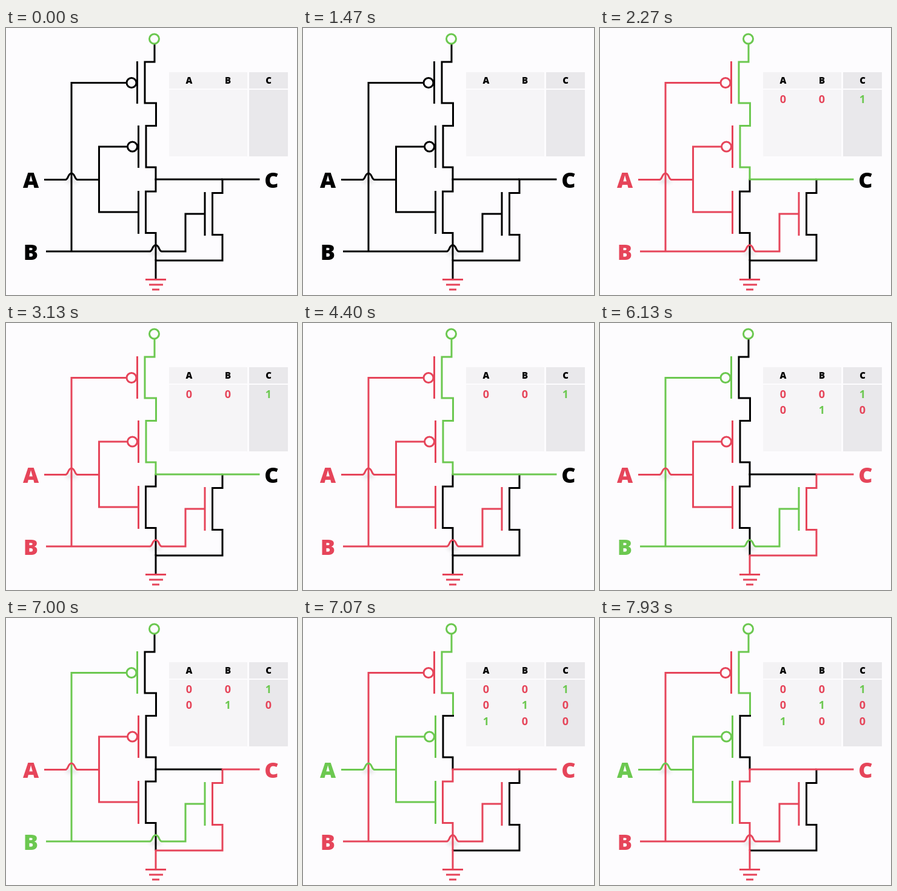
Recreate the animation shown at these times as an HTML page. Size 480 by 441 pixels, loop 8000 ms.

```html
<!DOCTYPE html>
<html lang="en">
<head>
<meta charset="utf-8">
<title>NOR gate</title>
<style>
  html, body { margin: 0; width: 100%; height: 100%; overflow: hidden; background: #fdfcfe; }
  svg { display: block; width: 100vw; height: 100vh; }
  .wire { fill: none; stroke-width: 3; }
  text { font-family: "Open Sans", sans-serif; font-weight: 800; text-anchor: middle; }
  .pin { font-size: 36px; }
  .head { font-size: 15px; }
  .bit { font-size: 18px; font-weight: 700; }
</style>
</head>
<body>
<svg viewBox="0 0 480 441">
  <defs><filter id="soft" x="-50%" y="-100%" width="200%" height="300%"><feGaussianBlur stdDeviation="3"/></filter></defs>
  <g fill="#000" opacity=".1" filter="url(#soft)">
    <ellipse cx="108" cy="253" rx="10" ry="4"/>
    <ellipse cx="247" cy="372" rx="10" ry="4"/>
  </g>
  <path fill="#f3f2f4" d="M269 73h129v27h-129z"/>
  <path fill="#f6f5f7" d="M269 102h129v110h-129z"/>
  <path fill="#e9e8eb" d="M401 73h64v27h-64zM401 102h64v110h-64z"/>
  <g id="wires"></g>
  <circle class="wire" cx="244.5" cy="18" r="8" stroke="#6cc850"/>
  <path class="wire" stroke="#e6455a" d="M230 415.5H264M236 424H259M241 432H253"/>
  <g id="labels"></g>
  <g id="table"></g>
</svg>
<script>
const LOOP = 8000, START = 2270, STEP = 2400;
const INK = { k: '#000', r: '#e6455a', g: '#6cc850' };

const hop = (x, y) => `H${x - 10}C${x - 5} ${y} ${x - 6} ${y - 10.5} ${x} ${y - 10.5}S${x + 5} ${y} ${x + 10} ${y}`;
const ring = (x, y) => `M${x - 8} ${y}a8 8 0 1 1 16 0a8 8 0 1 1 -16 0`;

// Each wire: path, then its colour while idle and for inputs 00, 01, 10.
const wires = [
  ['M245 27V56H229V124H247.5V162.5', 'kgkg'],
  ['M249 161.5H231V230H247V250', 'kgkk'],
  ['M247 250V270H230.5V338.5H247V384', 'kkkr'],
  ['M357 250V272.5H340.5V341.5H357V384H247', 'kkrk'],
  ['M247 382.5V415', 'kkrr'],
  ['M245.5 250H357', 'kgkr'],
  ['M355.5 250H418.5', 'kgrr'],
  [`M66 369${hop(247, 369)}H296V307H328M108 369V90.5H198${ring(207, 90.5)}M216.5 55V125M328 271V343`, 'krgr'],
  [`M63 250.5${hop(108, 250.5)}H153.5M200 196H153.5V304H218${ring(208.5, 196)}M218.5 161V231M218.5 269V340`, 'krrg']
];
const pins = [['A', 41, 264, 'krrg'], ['B', 41, 383, 'krgr'], ['C', 438, 264, 'kkrr']];
const columns = [302, 366, 433];
const rows = [['001', 124], ['010', 150], ['100', 177]];

function add(parent, tag, attrs, label = '') {
  const el = document.createElementNS('http://www.w3.org/2000/svg', tag);
  for (const name in attrs) el.setAttribute(name, attrs[name]);
  el.textContent = label;
  return document.getElementById(parent).appendChild(el);
}

const wireEls = wires.map(([d]) => add('wires', 'path', { class: 'wire', d }));
const pinEls = pins.map(([name, x, y]) => add('labels', 'text', { class: 'pin', x, y }, name));
columns.forEach((x, i) => add('labels', 'text', { class: 'head', x, y: 92 }, 'ABC'[i]));
const rowEls = rows.map(([bits, y]) => columns.map((x, i) =>
  add('table', 'text', { class: 'bit', x, y, fill: bits[i] === '1' ? INK.g : INK.r }, bits[i])));

function draw(now) {
  const time = now % LOOP;
  const state = time < START ? 0 : 1 + Math.floor((time - START) / STEP);
  wireEls.forEach((el, i) => el.setAttribute('stroke', INK[wires[i][1][state]]));
  pinEls.forEach((el, i) => el.setAttribute('fill', INK[pins[i][3][state]]));
  rowEls.forEach((cells, i) => cells.forEach(el => el.setAttribute('visibility', i < state ? 'visible' : 'hidden')));
}

const begin = performance.now();
function tick() {
  draw(performance.now() - begin);
  requestAnimationFrame(tick);
}
tick();
</script>
</body>
</html>
```
